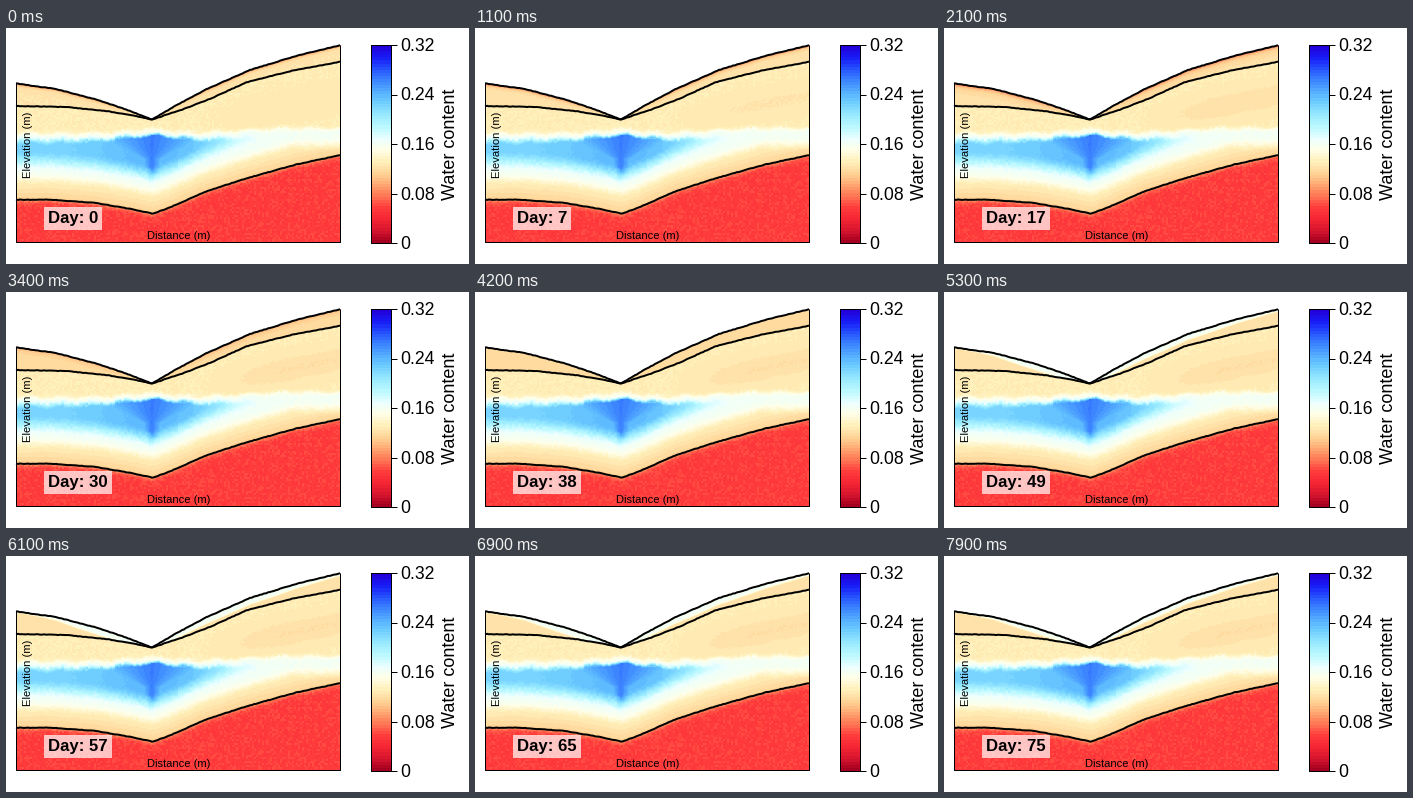
Animation of 463x236 px, one loop 8 s. Source, as a matplotlib script:

```python
import numpy as np
import matplotlib.pyplot as plt
from matplotlib.animation import FuncAnimation
from matplotlib.colors import LinearSegmentedColormap

W, H, DPI = 463, 236, 100
PX = 72 / DPI  # points per pixel
L, R, T, B = 10, 335, 17, 215
VALLEY = 146
plt.rcParams["font.family"] = "Liberation Sans"

CMAP = LinearSegmentedColormap.from_list("moisture", [
    "#a50021", "#d8152f", "#f72735", "#ff3d3d", "#ff7856", "#ffac75",
    "#ffd699", "#fff1bc", "#ffffea", "#eaffff", "#bcf9ff", "#99eaff",
    "#75d3ff", "#56b0ff", "#3d87ff", "#2857ff", "#181cf7", "#2400d8"], N=64)


def curve(*points):
    xs, ys = zip(*points)
    return lambda x: np.interp(x, xs, ys)


surface = curve((10, 55.5), (50, 61), (90, 71.5), (120, 81.5), (146, 91.5),
                (170, 77.5), (200, 61.5), (244, 42), (290, 28), (335, 17))
soil = curve((10, 78), (60, 79), (100, 83), (130, 88), (146, 91.5),
             (175, 82), (205, 70.5), (240, 54.5), (285, 43), (335, 33.5))
rock = curve((10, 171.7), (45, 171.7), (90, 175), (125, 181), (147, 185.7),
             (165, 179), (200, 163.5), (240, 150.5), (290, 136.5), (335, 127))


def smooth(t):
    t = np.clip(t, 0, 1)
    return t * t * (3 - 2 * t)


def bump(x, centre, width):
    return np.exp(-((x - centre) / width) ** 2)


rng = np.random.default_rng(4)
gx, gy = np.meshgrid(np.arange(L, R) + 0.5, np.arange(T, B) + 0.5)


def grain(size):
    cells = rng.uniform(-1, 1, (H // size + 1, W // size + 1))
    return np.kron(cells, np.ones((size, size)))[:B - T, :R - L]


speck, jitter = grain(2), grain(3)
top, mid, low = surface(gx), soil(gx), rock(gx)
side = gx - VALLEY
depth = np.maximum(gy - top, 0)


def lens():
    """Wet band: flat sharp top, lower edge parallel to the rock."""
    y = gy + jitter
    east = smooth((gx - 175) / 110)
    cap = 107 - 4 * bump(gx, VALLEY, 30) - 5 * east + np.sin(gx / 5)
    floor = np.maximum(low - 29, 108)
    peak = .222 + .016 * bump(side, 0, 60) - .058 * east
    rise = smooth((y - cap + 5) / 7)
    fill = smooth((y - cap - 1) / (9 - 4 * bump(side, 0, 60)))
    fade = smooth((floor + 2 - y) / 22)
    drain = smooth((y - floor - 1) / 15)
    out = .130 + .030 * rise + (peak - .160) * fill * fade - .034 * drain
    wedge = np.clip(1 - np.abs(side) / np.maximum(50 - 2 * (gy - 110), 8), 0, 1)
    return out + .028 * wedge * fill * fade


WET = lens() - .012 * smooth((gy - low + 14) / 14)
ROCK = .057 + .042 * np.exp(-np.maximum(gy - low, 0) / 2.2) + .006 * speck
SHADE = bump(gy, 86 - .2 * (gx - 240), 13) * smooth((gx - 190) / 90)
REACH = bump(np.where(side < 0, side + 50, side - 80), 0,
             np.where(side < 0, 55, 105))


def cover(day):
    """Top layer: dry crust early, then a wetting front from the surface."""
    dry = .05 * (1 - smooth((day - 18) / 22))
    crust = np.exp(-depth / (1.8 + day / 20)) * smooth((np.abs(side) - 5) / 60)
    base = .125 - .006 * smooth(day / 30) + .004 * smooth((day - 40) / 20)
    soak = smooth((day - 36) / 16) * (1 - .2 * smooth((day - 64) / 12))
    front = 6.5 * soak * REACH
    wet = smooth(2 * soak) * (1 - smooth((depth - front) / 3 + .5))
    return base - dry * crust + (.160 - base) * wet


def field(day):
    body = WET - (.004 + .006 * smooth(day / 22)) * SHADE
    soils = np.where(gy < mid, cover(day), body) + .0007 * speck
    return np.ma.masked_where(gy < top, np.where(gy > low, ROCK, soils))


fig = plt.figure(figsize=(W / DPI, H / DPI), dpi=DPI, facecolor="white")
ax = fig.add_axes([0, 0, 1, 1])
ax.axis("off")


def label(x, y, s, size, **kw):
    return ax.text(x, y, s, fontsize=size * PX, **kw)


def line(x, y, width):
    ax.plot(x, y, color="black", lw=width * PX, solid_capstyle="butt")


def picture(data, extent):
    return ax.imshow(data, cmap=CMAP, vmin=0, vmax=.32, extent=extent,
                     interpolation="nearest", aspect="auto")


img = picture(field(0), (L, R, B, T))
line([10, 10, 334, 334], [55, 214, 214, 17], 1)
xs = np.arange(L, R + 1, 2)
for f in (surface, soil, rock):
    line(xs, f(xs) + rng.uniform(-.25, .25, xs.size), 2)

# Colour bar
picture(np.linspace(.32, 0, 64)[:, None], (365, 386, 215, 17))
line([365, 385, 385, 365, 365], [17, 17, 215, 215, 17], 1)
for i in range(5):
    y = 17 + 49.5 * i
    line([385, 391], [y, y], 1)
    label(394.5, y + 6, f"{.32 - .08 * i:.2f}" if i < 4 else "0", 17.6)
label(453, 116, "Water content", 18, rotation=90, ha="right", va="center")

label(141, 211, "Distance (m)", 11.1)
label(27.5, 117, "Elevation (m)", 11.2, rotation=90, ha="right", va="center")
day_text = label(42, 195, "Day: 0", 16.7, weight="bold",
                 bbox=dict(facecolor="white", alpha=.7, edgecolor="none",
                           pad=4 * PX))
ax.set(xlim=(0, W), ylim=(H, 0))


def update(frame):
    day = max(0, frame - 4)
    img.set_data(field(day))
    day_text.set_text(f"Day: {day}")
    return img, day_text


anim = FuncAnimation(fig, update, frames=80, interval=100, repeat=True,
                     repeat_delay=0)
plt.show()
```
